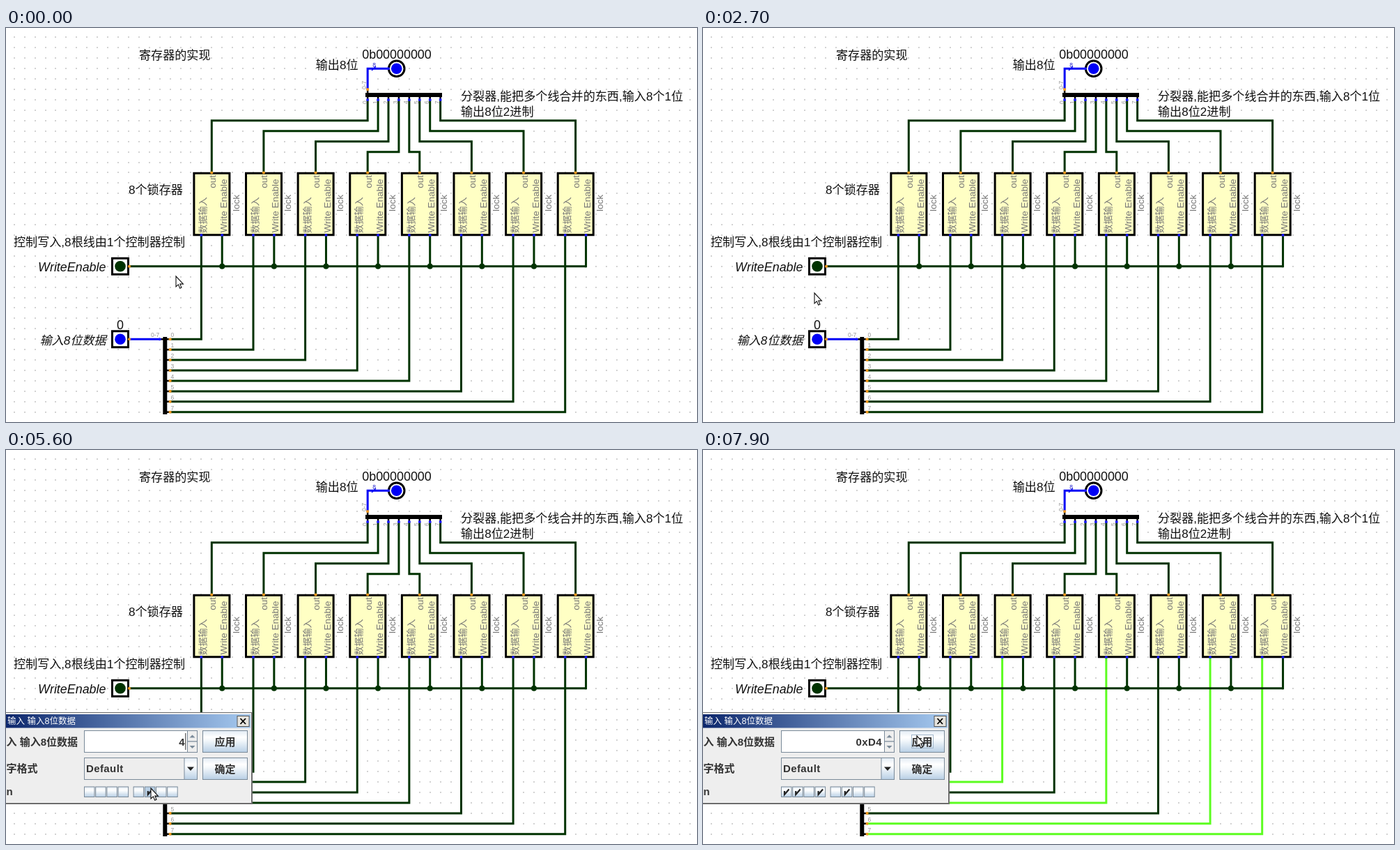
An HTML page that plays this animation: 992x565 px, repeating every 8000 ms.

```html
<!DOCTYPE html>
<html lang="zh">
<head>
<meta charset="utf-8">
<style>
  html, body { margin: 0; width: 100%; height: 100%; overflow: hidden; background: #fff; }
  svg { display: block; }
  text { font: 300 17.1px "Liberation Sans", "Noto Sans CJK SC", "Noto Sans CJK", sans-serif; fill: #111; }
  .latin { font-size: 17.9px; }
  .slant { font-style: italic; }
  .pin { font-size: 13.5px; fill: #777; }
  .cjk { font-size: 13px; }
  .tiny { font-size: 8.5px; fill: #999; }
  .title { font-size: 12.5px; font-weight: 400; fill: #fff; }
  .ui { font-size: 15px; font-weight: 700; fill: #333; }
  .wide { letter-spacing: .4px; }
  .mid { text-anchor: middle; }
  .end { text-anchor: end; }
  .wire { fill: none; stroke: #003200; stroke-width: 3; }
  .wire.on { stroke: #5cfd20; }
  .bus { fill: none; stroke: #0000f5; stroke-width: 3; }
  .bar { fill: none; stroke: #000; stroke-width: 6; }
  .stub { fill: none; stroke: #000; stroke-width: 2.5; }
  .shape { fill: #fff; stroke: #000; stroke-width: 3; }
  .chip { fill: #ffffc4; }
  .edge { stroke: #7a8a99; }
</style>
</head>
<body>
<svg id="stage" width="992" height="565" viewBox="0 0 992 565"></svg>
<script>
const G = 14.924, LOOP = 8000;
const gx = n => 295.3 + n * G;
const gy = n => 341.8 + n * G;
const out = [];
const add = s => out.push(s);

const path = (cls, d, extra = '') => add(`<path class="${cls}" d="${d}" ${extra}/>`);
const text = (x, y, s, cls = '', extra = '') => add(`<text x="${x}" y="${y}" class="${cls}" ${extra}>${s}</text>`);
const up = (x, y, s, cls) => text(0, 0, s, cls, `transform="translate(${x} ${y}) rotate(-90)"`);
const disc = (x, y, r, fill) => add(`<circle cx="${x}" cy="${y}" r="${r}" fill="${fill}"/>`);
const rect = (x, y, w, h, fill, extra = '') =>
  add(`<rect x="${x}" y="${y}" width="${w}" height="${h}" fill="${fill}" ${extra}/>`);
const pinIn = (x, y) => disc(x, y, 2, '#1a1aff');
const pinOut = (x, y) => disc(x, y, 2.1, '#f0981e');

function drawGrid() {
  let d = '';
  for (let y = gy(-22); y < 568; y += G)
    for (let x = gx(-19); x < 992; x += G) d += `M${Math.round(x) - 1} ${Math.round(y)}h2`;
  path('', d, 'stroke="#d2d2d2" stroke-width="2"');
}

function drawWires() {
  for (let i = 0; i < 8; i++) {
    const level = gy(-14 + Math.min(i, 7 - i));
    path('wire', `M${gx(15 + i)} ${gy(-16)}V${level}H${gx(5 * i)}V${gy(-9)}`);
    path('wire data', `M${gx(-4)} ${gy(7 + i)}H${gx(5 * i - 1)}V${gy(-3)}`);
    path('wire', `M${gx(5 * i + 1)} ${gy(-3)}V${gy(0) + 1.5}`);
    if (i < 7) disc(gx(5 * i + 1), gy(0), 4, '#003200');
  }
  path('wire', `M${gx(-8)} ${gy(0)}H${gx(36)}`);
  path('bus', `M${gx(-8)} ${gy(7)}H${gx(-5)}`);
  path('bus', `M${gx(15)} ${gy(-17)}V${gy(-19)}H${gx(17)}`);
  path('bus', 'M525 61l6-6', 'style="stroke-width:1.2"');
  text(528.5, 55.5, '8', 'tiny mid', 'style="fill:#22c"');
}

function drawSplitters() {
  path('bar', 'M516 96H626');
  path('stub', `M${gx(15)} ${gy(-17)}V96`);
  up(517, 88, '0-7', 'tiny');
  pinOut(gx(15), gy(-17));
  path('bar', 'M228.3 443V554');
  path('stub', `M${gx(-5)} ${gy(7)}H228`);
  text(208, 443, '0-7', 'tiny');
  pinIn(gx(-5), gy(7));
  for (let i = 0; i < 8; i++) {
    const x = gx(15 + i), y = gy(7 + i);
    path('stub', `M${x} 96V${gy(-16)}M228 ${y}H${gx(-4)}`);
    up(x - 1.5, 109, i, 'tiny');
    pinIn(x, gy(-16));
    text(236.5, y - 3, i, 'tiny');
    pinOut(gx(-4), y);
  }
}

function drawChips() {
  for (let i = 0; i < 8; i++) {
    const x = gx(5 * i);
    path('shape chip', `M${x - 25.4} 208.2h51v88.6h-51z`);
    up(x + 5.5, 211, 'out', 'pin end');
    up(x + 21.5, 293.5, 'Write Enable', 'pin');
    up(x - 8, 294.5, '数据输入', 'pin cjk');
    up(x + 39.5, 251, 'lock', 'pin mid');
    pinOut(x, gy(-9));
    pinIn(x - G, gy(-3));
    pinIn(x + G, gy(-3));
  }
}

function drawPorts() {
  for (const [row, fill] of [[0, '#003200'], [7, '#0000f5']]) {
    const y = gy(row);
    path('shape', `M152.5 ${y - 11.5}h23v23h-23z`);
    disc(164, y, 7.8, fill);
    pinOut(177, y);
  }
  add(`<circle class="shape" cx="560.7" cy="${gy(-19)}" r="11.3"/>`);
  disc(560.7, gy(-19), 7.8, '#0000f5');
  pinIn(gx(17), gy(-19));
}

function drawLabels() {
  text(191, 44.5, '寄存器的实现');
  text(505.5, 58.5, '输出8位', 'end');
  text(561, 44.3, '0b00000000', 'latin mid');
  text(653, 103.5, '分裂器,能把多个线合并的东西,输入8个1位');
  text(653, 125.5, '输出8位2进制');
  text(176, 237.5, '8个锁存器');
  text(11, 312.5, '控制写入,8根线由1个控制器控制');
  text(143.5, 349, 'WriteEnable', 'latin slant end');
  text(164, 432.3, '0', 'latin mid');
  text(143.5, 453.5, '输入8位数据', 'slant end');
}

function button(y, label) {
  rect(282.5, y, 64, 31, 'url(#metal)', 'class="edge"');
  text(314.5, y + 21.3, label, 'ui mid');
}

const boxX = i => 112.5 + i * 16.2 + (i > 3 ? 5.8 : 0);

function drawDialog() {
  add('<g id="dialog">');
  rect(-5, 376, 359, 132, '#6d6d6d');
  rect(-5, 377, 357, 129, '#f4f4f4');
  rect(-5, 378, 356, 127, '#eee');
  rect(-5, 379, 356, 19.5, 'url(#caption)');
  text(2, 393, '输入 输入8位数据', 'title');
  rect(332, 381.5, 17, 15, '#e6e4de', 'stroke="#555"');
  path('', 'M336.5 385l7.5 8m0-8l-7.5 8', 'stroke="#000" stroke-width="1.8"');

  text(0.5, 423.5, '入 输入8位数据', 'ui');
  rect(112.5, 402.5, 148, 31, '#fff', 'class="edge"');
  rect(248, 406, 9, 24, '#b0c6de', 'id="select"');
  text(257, 424, '0', 'ui wide end', 'id="value"');
  path('', 'M257.8 406V430', 'id="caret" stroke="#333"');
  rect(260.5, 402.5, 14, 15.5, '#eee', 'class="edge"');
  rect(260.5, 418, 14, 15.5, '#eee', 'class="edge"');
  path('', 'M263.5 412.5h8l-4-4zM263.5 424h8l-4 4z', 'fill="#7a8a99"');

  text(0.5, 462, '字格式', 'ui');
  rect(112.5, 441.5, 162, 31, '#eee', 'class="edge"');
  rect(256, 441.5, 18.5, 31, 'url(#metal)', 'class="edge"');
  path('', 'M260 454.5h10l-5 5.5z', 'fill="#222"');
  text(115, 461.5, 'Default', 'ui wide');
  button(402.5, '应用');
  rect(299.5, 408.5, 31, 19, 'none', 'id="focus" stroke="#a3b8cc"');
  button(441.5, '确定');

  text(0.5, 495, 'n', 'ui');
  for (let i = 0; i < 8; i++) {
    const x = boxX(i);
    rect(x, 483, 14.5, 14.5, 'url(#metal)', 'class="edge box"');
    path('tick', `M${x + 4.5} 489v5l6.5-7.5`, 'fill="none" stroke="#222" stroke-width="2.2"');
  }
  add('</g>');
}

add(`<defs>
  <linearGradient id="metal" x2="0" y2="1"><stop stop-color="#e2ebf4"/><stop offset=".3" stop-color="#fff"/>
    <stop offset=".45" stop-color="#f4f8fb"/><stop offset="1" stop-color="#b8cfe5"/></linearGradient>
  <linearGradient id="caption"><stop stop-color="#0a246a"/><stop offset="1" stop-color="#a6caf0"/></linearGradient>
</defs>`);
rect(0, 0, 992, 565, '#fff');
drawGrid();
drawWires();
drawSplitters();
drawChips();
drawPorts();
drawLabels();
drawDialog();
path('', 'M0 0V15L3.4 11.9 5.7 17.3 8 16.3 5.8 11.1H10.4Z', 'id="mouse" fill="#fff" stroke="#111" stroke-width="1.1"');

const stage = document.getElementById('stage');
stage.innerHTML = out.join('');
const $ = id => document.getElementById(id);
const all = s => [...stage.querySelectorAll(s)];
const ticks = all('.tick'), boxes = all('.box'), data = all('.data');
const show = (el, on) => el.setAttribute('visibility', on ? 'inherit' : 'hidden');

// time, x, y
const route = [
  [0, 244, 356], [300, 533, 75], [400, 533, 75], [600, 575, 62], [800, 612, 31], [1000, 540, 34],
  [1100, 475, 48], [1300, 568, 64], [1400, 530, 110], [1700, 181, 455], [1900, 172, 463],
  [2200, 156, 450], [2500, 158, 362], [2700, 160, 380], [3000, 165, 446], [3100, 165, 446],
  [3200, 165, 445], [3400, 165, 444], [3600, 165, 437], [3800, 165, 437], [4000, 165, 441],
  [4400, 165, 441], [4800, 200, 513], [5000, 207, 497], [5200, 208, 485], [5600, 208, 485],
  [5900, 168, 488], [6100, 167, 488], [6400, 138, 487], [6700, 138, 487], [6900, 120, 488],
  [7100, 119, 488], [7600, 307, 410], [8000, 307, 410]
];
const values = [[0, 0], [5200, 4], [6000, 0x14], [6500, 0x54], [7000, 0xD4]];

function mouseAt(t) {
  const k = route.findIndex(p => p[0] > t);
  const [t0, x0, y0] = route[k - 1], [t1, x1, y1] = route[k];
  const f = (t - t0) / (t1 - t0);
  return [x0 + (x1 - x0) * f, y0 + (y1 - y0) * f];
}

function render(ms) {
  const t = Math.floor((ms % LOOP) / 100) * 100;
  const [mx, my] = mouseAt(t);
  const v = values.filter(p => p[0] <= t).pop()[1];
  const applied = t >= 7800;

  $('mouse').setAttribute('transform', `translate(${mx} ${my})`);
  show($('dialog'), t >= 4200);
  show($('select'), t >= 4200 && v === 0);
  show($('caret'), v > 0 && t < 7700);
  show($('focus'), t >= 7700);
  $('value').textContent = v < 10 ? v : '0x' + v.toString(16).toUpperCase();
  boxes.forEach((b, i) => {
    const x = boxX(i), hover = mx >= x && mx < x + 15 && my > 482 && my < 498;
    b.setAttribute('fill', hover ? '#b8cfe5' : 'url(#metal)');
    show(ticks[i], t >= 4200 && v >> (7 - i) & 1);
  });
  data.forEach((w, i) => w.classList.toggle('on', applied && !!(v >> i & 1)));
}

const start = performance.now();
function tick() {
  render(performance.now() - start);
  requestAnimationFrame(tick);
}
tick();
</script>
</body>
</html>
```
